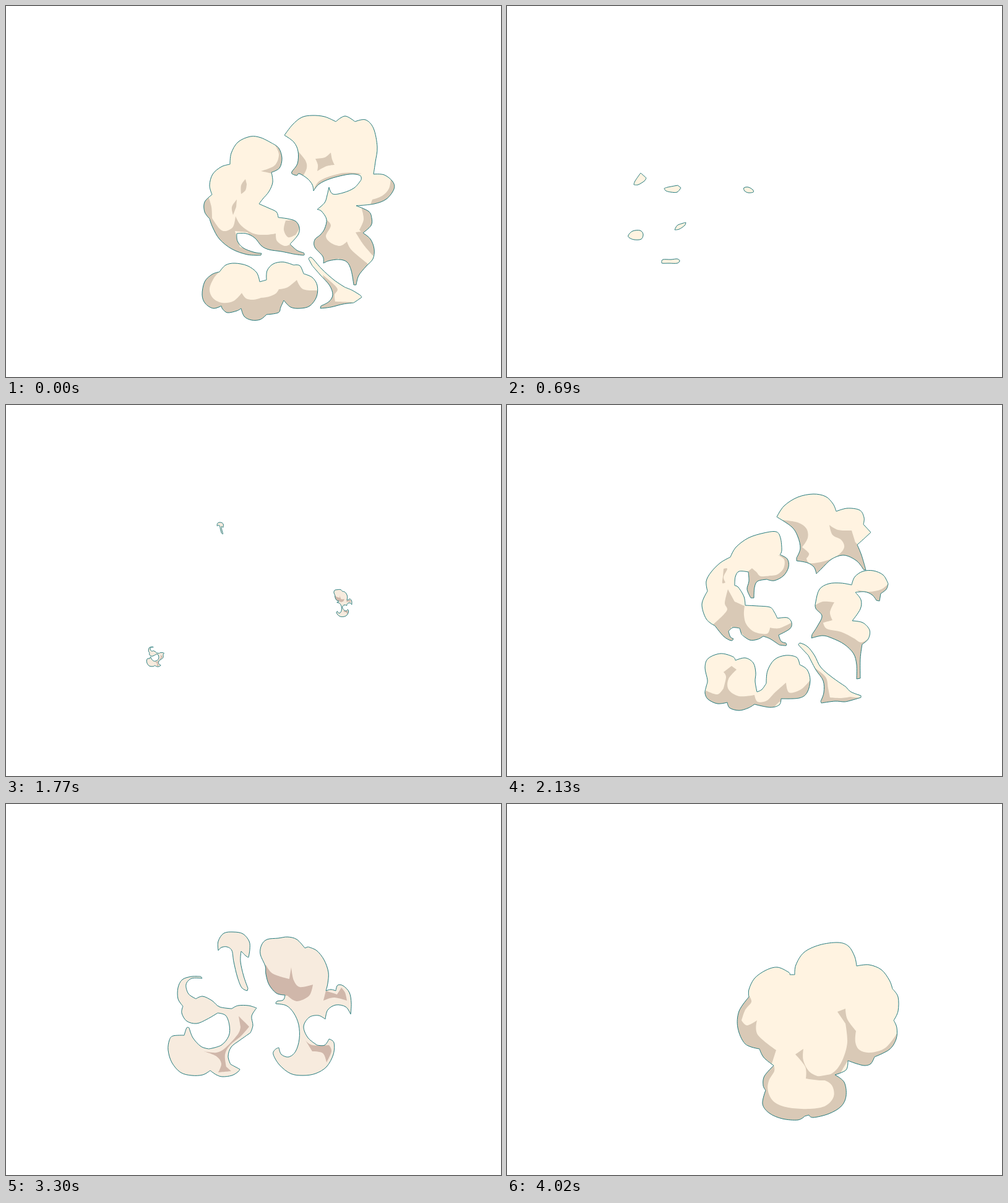
Animation, 800 px wide and 600 px high, one loop 4080 ms. Source, as an HTML page with a canvas:

```html
<!DOCTYPE html>
<html lang="en">
<head>
<meta charset="utf-8">
<title>Smoke puffs</title>
<style>
html, body { margin: 0; width: 100%; height: 100%; overflow: hidden; background: #fff; }
canvas { display: block; }
</style>
</head>
<body>
<canvas id="stage" width="800" height="600"></canvas>
<script>
const ctx = document.getElementById('stage').getContext('2d');
const OUTLINE = '#23797b';
const CREAM = ['#fff3e1', '#d9c9b6'];
const ROSE = ['#f7ebde', '#d0b7aa'];

// "x,y" is a smooth point, "x,y!" a corner; the closed curve runs through all of them.
function parse(text) {
  return text.trim().split(/\s+/).map(token => {
    const [x, y] = token.replace('!', '').split(',').map(Number);
    return { x, y, corner: token.endsWith('!') };
  });
}

function trace(points) {
  const n = points.length, at = i => points[(i + n) % n];
  const handle = (i, sign) => {
    const p = at(i), k = p.corner ? 0 : sign / 6;
    return [p.x + (at(i + 1).x - at(i - 1).x) * k, p.y + (at(i + 1).y - at(i - 1).y) * k];
  };
  const path = new Path2D();
  path.moveTo(at(0).x, at(0).y);
  for (let i = 0; i < n; i++) {
    path.bezierCurveTo(...handle(i, 1), ...handle(i + 1, -1), at(i + 1).x, at(i + 1).y);
  }
  path.closePath();
  return path;
}

function shape(outline, shades = '', colors = CREAM) {
  const points = parse(outline);
  const middle = key => {
    const values = points.map(p => p[key]);
    return (Math.min(...values) + Math.max(...values)) / 2;
  };
  return {
    body: trace(points),
    shades: shades.split('|').filter(Boolean).map(s => trace(parse(s))),
    colors, cx: middle('x'), cy: middle('y')
  };
}

// Draws a shape centred on (x, y); swell thickens it evenly.
function draw(s, { x = s.cx, y = s.cy, sx = 1, sy = sx, swell = 0, colors = s.colors } = {}) {
  const matrix = new DOMMatrix([sx, 0, 0, sy, x - s.cx * sx, y - s.cy * sy]);
  const moved = path => {
    const result = new Path2D();
    result.addPath(path, matrix);
    return result;
  };
  const body = moved(s.body);
  ctx.lineJoin = 'round';
  if (swell) {
    ctx.strokeStyle = OUTLINE;
    ctx.lineWidth = swell + 2;
    ctx.stroke(body);
    ctx.strokeStyle = colors[0];
    ctx.lineWidth = swell;
    ctx.stroke(body);
  }
  ctx.fillStyle = colors[0];
  ctx.fill(body);
  ctx.save();
  ctx.clip(body);
  ctx.fillStyle = colors[1];
  s.shades.forEach(shade => ctx.fill(moved(shade)));
  ctx.restore();
  if (!swell) {
    ctx.strokeStyle = OUTLINE;
    ctx.lineWidth = 1;
    ctx.stroke(body);
  }
}

const cloud = shape(
  `465,276! 467,260 480,240 505,228 535,224 552,230 562,247 565,262! 585,260 605,268 618,285 623,299!
  632,312 632,335 625,350! 630,362 629,380 618,397 594,409! 588,420 578,423 565,420 551,415! 548,430 530,438!
  545,450 548,472 540,489 520,501 495,507 488,503! 481,505! 470,511 445,509 424,500 413,485 418,463!
  414,455 416,440 431,423! 415,410 408,396! 385,388 373,362 375,335 391,312! 391,300 400,282 418,269
  437,264 455,272 457,276!`,
  `391,310! 395,320 385,333 379,350! 388,358 404,350! 405,373 435,398! 428,420! 400,400! 360,365! 365,320!
  |534,336! 547,331! 550,348 564,367! 563,385 570,398 588,402 612,394 631,370! 640,400! 590,430! 550,416!
  535,442! 510,447 483,444! 482,425 466,405! 479,396! 479,415 490,434 510,441 530,432 543,412 550,385 547,355!
  |431,422! 432,432 423,448 422,465 432,482 455,491 490,493 515,488 528,473 525,455 510,446 483,444!
  530,436! 560,450! 550,500! 480,515! 410,510! 405,450!`);

const burst = [
  shape(
    `450,209! 463,192 478,180 495,177 515,179 533,187! 548,178 564,187! 581,184 594,198 600,228 597,252 594,272!
    611,273 625,284 627,296 615,312 595,320 566,323! 586,332 591,343 590,355 577,367! 589,377 595,393 593,409
    582,421 570,436 566,451! 562,451! 558,428 551,414 538,410 522,412 513,416! 512,405 499,390 499,378 508,370
    515,360 518,345 510,332 503,329! 515,318 519,306 522,293! 528,304 545,302 563,294 574,281! 572,274 555,272
    525,279 506,288 497,299! 495,289 487,279 474,271 470,274 463,272! 462,268 471,255 472,235 465,220`,
    `472,235! 484,250 486,262 480,275! 455,275!
    |500,247! 515,245 525,237! 527,248 531,257! 518,259 503,267! 504,257
    |497,299! 508,282 545,270 575,271! 545,277 515,285!
    |622,278! 619,295 608,307 592,313! 588,324! 615,320! 635,295!
    |574,325! 578,345 571,362! 577,368! 600,358! 592,330!
    |517,345! 525,355 517,372 525,383 540,388 551,381! 557,393 570,405 585,417! 566,456! 552,440! 538,408!
    512,420! 490,385!
    |565,366! 577,385 593,404! 600,390! 580,364!`),
  shape(
    `362,256! 364,238 375,220 395,211 412,213 430,222! 441,230 446,246 442,262 429,269! 431,285 425,300 415,312
    409,320! 425,327 437,333 440,342! 455,344 468,348 474,358 472,370 459,385! 470,395 481,399! 481,403 464,401!
    445,397 425,394 413,388 402,375 388,368 373,368! 374,380 383,391 400,398 413,400! 412,403! 390,402 365,393
    345,377 334,358 329,344! 321,333 321,317 333,305! 329,290 334,272 348,260`,
    `434,224! 441,240 434,258 412,267! 435,272! 452,262! 450,230!
    |387,280! 380,290 380,304! 387,298 389,288!
    |373,313! 365,325 367,338! 372,325!
    |327,308! 332,325 333,343! 345,360 355,364 367,357 371,340! 380,355 400,368 420,370 436,368! 438,380 450,388
    460,385! 490,400! 470,408! 440,404! 413,390! 390,366! 370,364! 378,390! 418,400! 410,408! 365,402! 330,370! 314,325!
    |452,347! 449,362 456,374 468,370! 474,358 468,346!`),
  shape(
    `345,430! 355,419 370,416 390,420 405,431 410,446! 421,443! 422,428 432,417 448,414 465,419! 475,420 481,433!
    495,439 503,452 502,470 491,485 475,489 460,487 449,476! 444,487 440,496 421,499! 411,507 397,508 385,502
    380,489! 373,493 358,496 350,490 348,485! 335,489 322,481 317,467 321,446 333,434`,
    `347,428! 336,440 329,458 335,473 350,480 368,477 381,464! 388,473 400,475 412,472! 425,470 436,465 441,458!
    455,455 470,443! 480,458 504,460! 506,490! 450,492! 400,514! 350,500! 310,485! 312,440!`),
  shape(
    `489,409! 494,407 510,425 530,443 548,455! 560,460 573,468! 575,471! 562,480! 545,482 525,487 508,489!
    509,485! 522,478 528,467 523,452 508,435 495,420!`,
    `512,435! 535,456 531,467 532,478! 560,479! 540,492! 500,494! 520,475!`)
];

// Each drifting piece carries the point it dissolves towards.
const drifting = [
  [390, 172, shape(
    `436,181! 448,163 470,149 495,144 515,148 527,160 532,172! 550,167 570,170 577,182 576,193! 588,206!
    575,218 566,226! 573,243 580,267! 576,266! 565,252 545,243 525,249 508,265 500,273! 496,262 485,255
    468,252! 468,247! 474,232 470,213 460,197`,
    `445,186! 470,190 484,200 486,215 477,230! 488,240 484,248! 490,256 515,252 535,243 545,230 540,218 526,210
    521,194! 535,202 557,203! 563,222! 585,245! 590,275! 545,247! 500,280! 460,256!`)],
  [235, 290, shape(
    `361,246! 370,230 390,215 415,207 435,205 442,215 444,235 441,242! 453,249 455,262 447,276 432,284 420,282!
    405,285 400,295 399,312! 394,312! 388,298 391,285 390,270! 375,269 369,278 368,292! 374,295 383,310 385,324!
    405,325 425,327 432,335 437,345! 453,344 460,352 457,362 439,372! 443,382 451,385! 451,389 440,388!
    425,378 414,374! 405,379 392,380 379,371! 376,361! 365,360 358,366! 361,375 366,378! 362,381 350,374 336,357!
    322,346 315,322 324,301! 322,285 330,270 345,255`,
    `438,243! 448,250 447,264 437,274 425,276! 410,277 403,270 396,264! 386,272! 390,318! 402,314! 405,290!
    430,292! 460,275! 460,245!
    |350,265! 356,265 350,278 353,287! 348,288 349,278!
    |357,298! 352,320 355,333 332,356! 350,388! 368,385! 362,358! 380,370! 395,386! 415,378! 440,394! 455,392!
    440,372! 462,362! 460,352! 440,361 425,360! 420,370 400,367 387,355 383,340 384,325! 368,318!`)],
  [390, 298, shape(
    `499,318 505,298 520,289 540,288 557,291! 562,278 575,269 592,268 608,275 616,289! 613,298 604,305!
    602,317! 597,316! 590,307 578,302 563,303! 572,315 571,330 558,349! 575,352 586,364 584,378 574,387!
    571,410 571,442! 565,443! 565,420 560,402 545,387 525,377 510,373 492,377! 493,371! 502,357 509,341 499,329`,
    `495,326! 510,318 529,319! 522,335 526,348! 511,352! 517,362 540,367 560,377 573,384 588,375! 578,392!
    578,450! 558,445! 545,390! 485,382! 505,345!
    |618,287! 605,298 585,302 565,299! 600,322! 620,300!`)],
  [235, 405, shape(
    `324,445 320,425 325,410 345,402 365,407 369,413! 385,409 398,417 402,433 401,447 404,464! 412,460 419,450!
    421,430 432,412 450,405 468,408 473,420! 485,428 490,445 485,465 472,474 443,475! 440,485 425,489 400,484!
    390,490 375,494 360,490 356,481! 340,483 325,476 320,466 322,455`,
    `363,422! 371,428! 358,443 358,460 375,471 400,469! 405,480 420,478 433,465 451,449! 456,465 475,460 490,445!
    495,478! 440,480! 425,495! 400,488! 370,500! 350,487! 310,475! 322,462! 340,468 350,458! 354,440 350,432!`)],
  [280, 357, shape(
    `471,388! 474,385 486,391 497,405 507,424 525,440 548,456! 556,464 572,470! 572,473! 555,478 545,480 530,479
    508,482! 507,479! 512,465 511,446 499,428 487,405!`,
    `497,425! 515,440 519,458 522,473! 540,474 555,472! 574,474! 550,490! 500,485! 512,460!`)]
];

const flecks = [
  '216,270! 225,278! 222,283 212,289 205,289! 207,283',
  '254,295! 260,293 276,290! 281,294! 275,301 265,301 257,299',
  '383,294 390,293 397,297 398,301 390,302 384,299',
  '196,371 203,364 215,363 220,369 217,377 206,378 198,375',
  '271,362! 275,355 282,352 289,350! 287,355 278,361',
  '250,414! 252,410 265,410 275,409 279,412 275,416 262,416 251,416'
].map(outline => shape(outline));

const wisps = [
  [345, 196, shape(
    `343,237! 343,222 352,209 368,207 383,210 393,222 394,235 392,248! 388,246 380,238! 379,255 384,278 391,298!
    390,302! 381,297 374,280 368,255 365,237 357,231 348,232`, '', ROSE)],
  [236, 410, shape(
    `317,282! 300,282 291,292 295,307 307,315! 318,311 333,318 345,328 365,331! 375,326 392,326 405,330!
    397,343 399,358 395,370! 378,382 364,393 359,408 363,421! 378,429! 375,433 365,439 350,441 340,438 330,431!
    318,438 300,439 282,434 268,418 262,398 264,382 270,375 288,374! 292,362 296,362! 302,378 315,392 328,396!
    348,390 360,375 361,358 355,342 342,338! 325,348 308,355 292,351 284,338 286,327! 278,315 278,297 285,284
    300,279 315,279!`,
    `376,343! 393,360! 380,375 362,390 354,405 356,425! 364,432! 343,434! 348,420 340,408 320,400!
    340,402 355,394 375,372 379,360!`, ROSE)],
  [548, 320, shape(
    `411,243 413,228 422,219 440,217 455,215 470,219 483,233! 488,231! 502,237 514,252 521,272 520,290 517,302!
    525,300 533,302! 536,293 545,294 555,305 558,322 557,340! 549,328 533,325 520,333 516,348! 505,342 490,345
    481,360 488,378 503,390! 515,390 522,380! 530,386 529,405 518,425 500,436 480,439 460,436 442,422 432,405
    435,397 441,394! 445,405 457,409 468,400 474,380 473,357 465,338 453,326 436,323! 438,319 448,317 451,309!
    437,306 425,292 420,275 419,262`,
    `420,260! 428,272 440,278 458,283! 461,264! 465,285 475,296 496,292! 490,310 470,319 455,310! 430,308! 412,280!
    |517,302! 513,318! 530,313 551,318! 548,305 542,297! 535,308!
    |484,382! 495,390 522,390! 526,400 518,418! 512,403 495,400!`, ROSE)]
];

// Every piece shrinks while it drifts to its end point.
function dissolve(pieces, u) {
  for (const [x, y, piece] of pieces) {
    draw(piece, {
      x: piece.cx + (x - piece.cx) * u,
      y: piece.cy + (y - piece.cy) * u,
      sx: 1 - 0.85 * u
    });
  }
}

const CYCLE = 2040;
const STEPS = [0, 90, 180, 240, 300, 360, 420, 510, 600, 690, 750, 840, 870, 930, 990, 1050, 1110, 1170,
  1260, 1320, 1410, 1470, 1530, 1590, 1650, 1710, 1770, 1800, 1830, 1890, 1980];

function render(t) {
  ctx.clearRect(0, 0, 800, 600);
  if (t < 90) {
    burst.forEach(piece => draw(piece));
  } else if (t < 690) {
    dissolve(drifting, (t - 90) / 600);
  } else if (t < 750) {
    flecks.forEach(fleck => draw(fleck));
  } else if (t < 840) {
    flecks.forEach(fleck => draw(fleck, { x: fleck.cx - 18, sx: 0.6 }));
  } else if (t < 1110) {
    const size = Math.min(1, 0.25 + (t - 840) / 170);
    draw(cloud, { x: 421, y: 325, sx: 1.15 * size, sy: 0.855 * size, colors: ROSE });
  } else if (t < 1260) {
    const swell = (1260 - t) / 6;
    wisps.forEach(([, , piece]) => draw(piece, { swell }));
  } else if (t < 1800) {
    dissolve(wisps, (t - 1260) / 540);
  } else if (t < 1980) {
    const size = Math.min(0.97, 0.35 + (t - 1800) / 140);
    draw(cloud, { x: cloud.cx + 8, y: cloud.cy - 2, sx: size });
  } else {
    draw(cloud);
  }
}

const start = performance.now();
function tick() {
  const t = Math.max(0, performance.now() - start) % CYCLE;
  render(STEPS.filter(step => step <= t).pop());
  requestAnimationFrame(tick);
}
tick();
</script>
</body>
</html>
```
